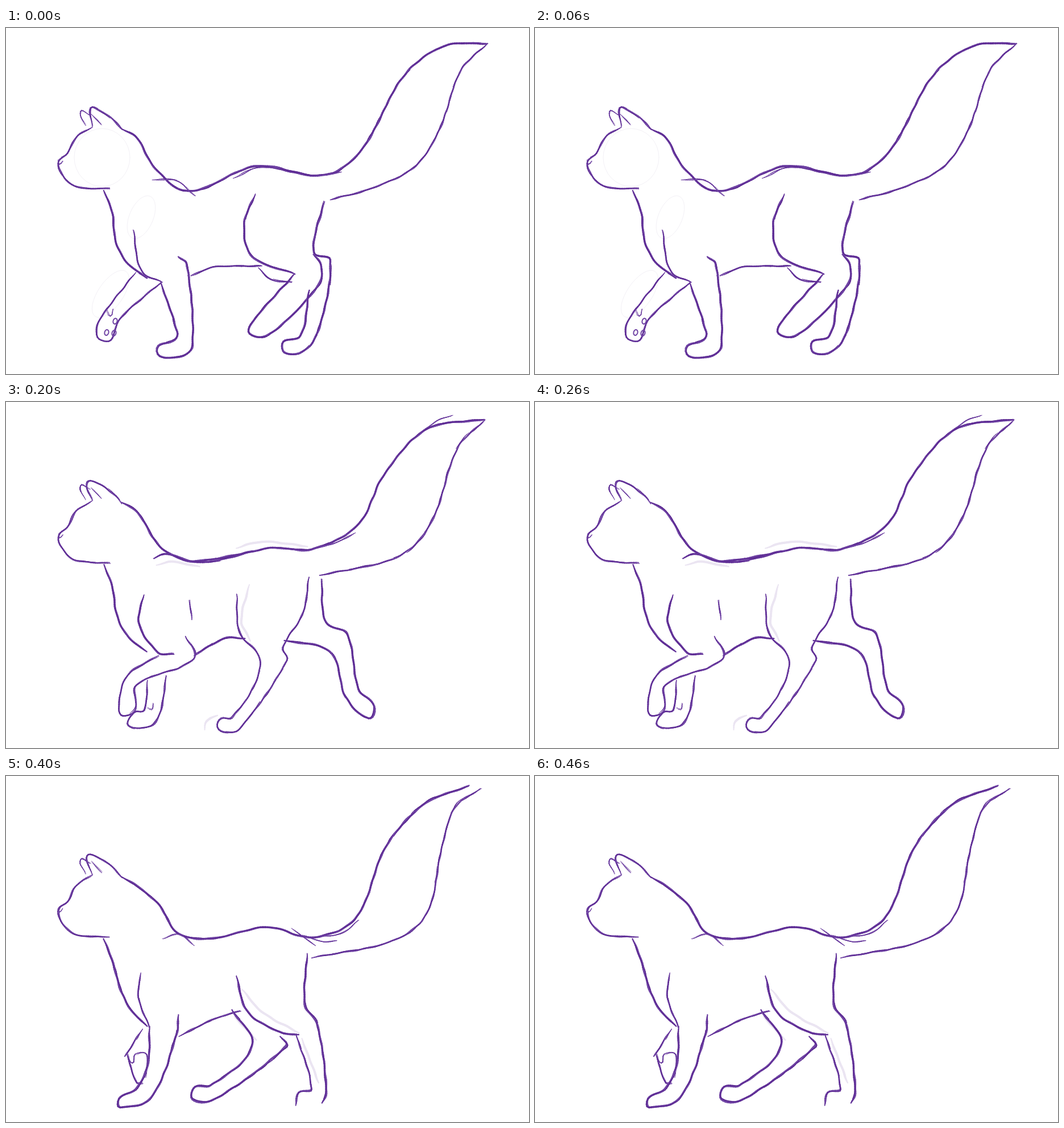
Animation of 920 by 609 pixels, one loop 0.5 s. Source, as an HTML page with a canvas:

```html
<!DOCTYPE html>
<html lang="en">
<head>
<meta charset="utf-8">
<title>Walking cat sketch</title>
<style>
  html, body { margin: 0; width: 100%; height: 100%; overflow: hidden; background: #fff; }
  canvas { display: block; }
</style>
</head>
<body>
<canvas id="stage" width="920" height="609"></canvas>
<script>
const ctx = document.getElementById('stage').getContext('2d');
const STEP = 100;
let seed = 1;

function rand() {
  seed = (seed * 16807) % 2147483647;
  return seed / 2147483647;
}

// Samples a smooth curve through "x y x y ..." about every 4 px.
function curve(path) {
  const n = path.split(' ').map(Number), p = [], out = [];
  for (let i = 0; i < n.length; i += 2) p.push([n[i], n[i + 1]]);
  for (let i = 0; i < p.length - 1; i++) {
    const a = p[i], b = p[i + 1];
    const len = Math.hypot(b[0] - a[0], b[1] - a[1]) || 1;
    const handle = (from, to) => {
      const dx = to[0] - from[0], dy = to[1] - from[1], k = len / 3 / (Math.hypot(dx, dy) || 1);
      return [dx * k, dy * k];
    };
    const h = handle(p[i - 1] || a, b), g = handle(a, p[i + 2] || b);
    const steps = Math.max(2, Math.round(len / 4));
    for (let s = i ? 1 : 0; s <= steps; s++) {
      const t = s / steps, u = 1 - t;
      out.push([0, 1].map(k => u * u * u * a[k] + 3 * u * u * t * (a[k] + h[k])
        + 3 * u * t * t * (b[k] - g[k]) + t * t * t * b[k]));
    }
  }
  return out;
}

// Tapered line with a slight wobble.
function trace(pts, width, color, dx = 0, dy = 0) {
  const phase = rand() * 6, last = pts.length - 1;
  const at = i => [pts[i][0] + dx + Math.sin(i * 0.8 + phase) / 2,
                   pts[i][1] + dy + Math.cos(i * 0.6 + phase) / 2];
  ctx.strokeStyle = color;
  for (let i = 0; i < last; i++) {
    const edge = Math.min(1, (Math.min(i, last - i) + 1) / 5);
    ctx.lineWidth = width * (0.4 + 0.6 * edge);
    ctx.beginPath();
    ctx.moveTo(...at(i));
    ctx.lineTo(...at(i + 1));
    ctx.stroke();
  }
}

// One main line plus short overlapping touches, like a pencil sketch.
function sketch(path, width) {
  const pts = curve(path), shift = () => (rand() - 0.5) * 2.6;
  trace(pts, width, '#7145a5');
  for (let i = 0; i < pts.length - 4;) {
    const size = 6 + Math.floor(rand() * 12);
    trace(pts.slice(i, i + size), width * 0.6, '#5d2b93', shift(), shift());
    i += Math.ceil(size * 0.8);
  }
}
const pen = path => sketch(path, 2.7);
const bold = path => sketch(path, 3.5);
const thin = path => sketch(path, 1.8);
const faint = path => trace(curve(path), 4, '#ebe5f2');

function ring(x, y, rx, ry, tilt, color, width) {
  ctx.strokeStyle = color;
  ctx.lineWidth = width;
  ctx.beginPath();
  ctx.ellipse(x, y, rx, ry, tilt, 0, 7);
  ctx.stroke();
}
const guide = (x, y, rx, ry, tilt) => ring(x, y, rx, ry, tilt, '#f3f1f6', 1);
const pad = (x, y) => ring(x, y, 3.5, 5, 0.3, '#7145a5', 2);

// Parts that barely change through the walk.
function head(earX) {
  pen('152 174 124 192 108 221 93 234 97 255 118 277 145 282 182 283');
  thin('92 232 94 240 100 234');
  thin('140 172 131 147 148 154');
  pen(`152 173 ${earX} 141 165 145 190 163 204 179`);
  thin('150 151 168 170');
}
const back = path => bold('203 177 230 193 ' + path);
const chest = slim => bold(`172 286 187 325 ${193 + slim} 375 ${212 + slim} 412 248 440`);

function liftBody() {
  guide(169, 228, 49, 51, 0);
  guide(238, 333, 21, 40, 0.4);
  guide(184, 468, 22, 48, 0.6);
  head(149);
  back('260 244 320 287 440 243 560 259 625 215 700 84 770 32 847 27');
  thin('257 268 300 269 332 296');
  thin('400 265 450 245 535 260 590 254');
  pen('847 27 800 75 762 180 718 245 640 283 570 302');
  chest(0);
  pen('224 355 238 427 275 448');
  pen('325 436 365 421 450 419');
  bold('438 293 419 345 433 402 508 433');
  pen('444 422 465 442 502 448');
}
function liftLegs() {
  pen('228 430 167 510 159 535 164 548 184 549 200 512 272 448');
  thin('178 496 184 507 189 495');
  pad(192, 516); pad(177, 536); pad(190, 537);
  bold('272 448 301 535 297 549 268 560 270 577 308 578 328 560 318 415 303 403');
  bold('508 433 433 518 429 538 462 540 548 455 555 420 541 398');
  bold('560 306 541 395 570 408 552 525 525 568 490 571 488 552 518 542 533 462');
}

function reachBody() {
  faint('665 180 700 92 805 28');
  faint('550 262 625 245 655 215');
  faint('555 300 600 283 660 270');
  faint('410 250 440 238 510 236');
  head(142);
  back('275 258 330 280 460 250 553 259 640 210 715 114 800 48 908 41');
  thin('268 262 320 285 375 274');
  thin('553 258 595 245 628 225');
  pen('908 42 838 96 790 212 730 270 640 288 549 309');
  chest(0);
  bold('226 404 255 441 285 446 319 430');
  pen('343 434 370 421 430 418');
  pen('426 358 425 395 469 456');
}
function reachLegs() {
  faint('260 445 260 467 212 512');
  faint('450 484 412 542');
  pen('212 436 160 527 160 535 133 536 124 569 160 568 185 545 247 448');
  pen('160 527 165 540 178 528');
  pen('306 386 332 392 340 515 361 540 352 563 318 525 305 440');
  bold('469 456 417 550 411 568 425 576 440 574 518 460 502 418 535 355 541 320');
  bold('554 314 545 395 580 406 600 515 583 567 538 566 540 545 567 542 563 490 552 466 513 460');
}

function passBody() {
  faint('405 257 450 246 530 254');
  faint('265 287 290 281 340 290');
  faint('428 322 414 385 430 420');
  head(143);
  back('275 258 340 282 465 257 540 259 620 215 665 128 740 48 842 31');
  bold('260 276 282 267 330 280 440 262');
  thin('725 58 755 35 785 23');
  thin('540 258 585 246 615 230');
  pen('842 32 795 80 748 212 690 272 552 305');
  chest(2);
  bold('242 340 234 390 268 441 295 443');
  pen('323 349 327 383');
  bold('331 446 385 416 420 416');
}
function passLegs() {
  faint('350 577 352 562 372 552');
  pen('268 446 213 482 198 540 206 553 228 540 230 498 330 452 316 412');
  pen('249 490 243 542 225 546 216 569 255 570 272 545 282 482');
  thin('249 538 257 541 259 530');
  pen('406 338 411 405 446 450 436 500 397 555 378 557 372 572 382 580 408 578 494 455 487 432 522 372 533 308');
  bold('555 312 563 388 600 408 620 505 648 535 638 557 598 520 570 440 490 420');
}

function plantBody() {
  head(140);
  bold('97 232 99 246');
  back('268 237 325 283 450 254 550 266 640 216 715 115 800 62 880 51');
  thin('410 258 450 248 494 241');
  thin('272 252 318 284 362 285');
  thin('550 266 600 261 623 247');
  pen('874 58 790 205 730 266 630 297 531 311');
  chest(10);
  thin('250 318 235 375 244 440');
  pen('317 427 311 455');
  pen('311 455 365 428 416 411');
}
function plantLegs() {
  pen('246 440 170 524 137 570 155 576 210 520 314 458');
  pen('281 480 298 525 294 541 272 560 275 566 316 567 328 545 310 468');
  thin('300 518 304 530 307 517 311 532');
  bold('410 327 410 380 435 425 484 456 495 500 493 545 467 546 460 579 500 580 520 556');
  thin('487 462 460 520 455 545');
  pen('495 495 490 520 470 545');
  bold('524 553 526 460 504 418 520 355 521 316');
  pen('540 316 526 390 545 408 526 452 528 515');
}

function swingBody() {
  faint('415 375 450 415 515 452');
  faint('402 425 425 448 440 465');
  head(143);
  back('270 228 303 277 360 286 460 266 540 284 615 250 668 125 735 50 815 17');
  thin('275 286 305 279 331 299');
  thin('502 268 545 299');
  thin('520 280 555 291 582 290');
  thin('550 282 590 277 620 254');
  pen('835 22 790 55 767 125 740 242 680 290 538 320');
  chest(8);
  pen('237 347 233 390 252 442');
  pen('304 458 365 428 412 413');
  bold('405 352 425 415 485 452 515 455');
}
function swingLegs() {
  faint('520 462 550 540');
  pen('240 445 209 494');
  pen('213 490 230 540 241 541');
  thin('215 489 222 505 228 490 247 490 245 530');
  bold('252 442 250 505 230 549 199 568 201 583 255 566 300 455 303 420');
  bold('397 412 433 475 360 545 333 547 328 569 365 570 493 475 482 458');
  pen('510 455 537 550 515 557 510 580');
  bold('530 312 526 405 547 435 564 555 556 576');
}

const bodies = [liftBody, reachBody, passBody, plantBody, swingBody];
const legs = [liftLegs, reachLegs, passLegs, plantLegs, swingLegs];
const start = performance.now();
let shown = -1;

function tick() {
  const pose = Math.floor((performance.now() - start) / STEP) % bodies.length;
  if (pose !== shown) {
    shown = pose;
    seed = 71 + pose * 1013;
    ctx.fillStyle = '#fff';
    ctx.fillRect(0, 0, 920, 609);
    ctx.lineCap = 'round';
    bodies[pose]();
    legs[pose]();
  }
  requestAnimationFrame(tick);
}
tick();
</script>
</body>
</html>
```
